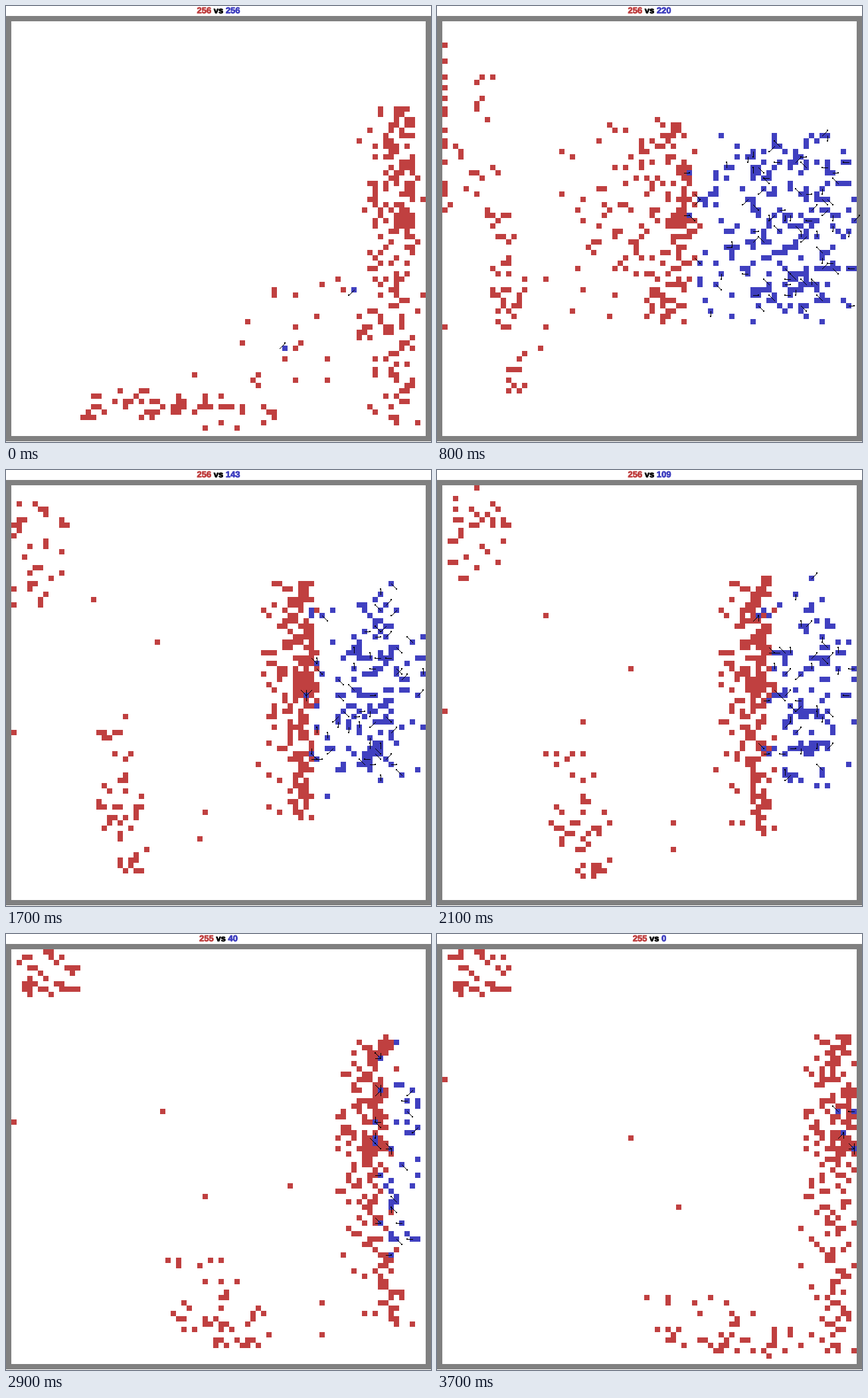
A matplotlib script for the animation above (3800 ms loop, 640 by 656 pixels).

```python
import numpy as np
import matplotlib.pyplot as plt
from matplotlib.animation import FuncAnimation
from matplotlib.patheffects import withStroke

W, H, DPI = 640, 656, 100
CELL, SIZE = 8, 78
FRAMES, LAST = 38, 36
CONTACT = 8                          # the charge ends, the battle line forms
ORIGIN = np.array([12, 27])          # centre of the top left cell
MIDDLE = 325                         # height where the line is densest
RIGHT = 628
WHITE, GRAY = (255, 255, 255), (128, 128, 128)
SIDES = {1: (192, 64, 64), 2: (64, 64, 192)}
RED, BLUE = "#c04040", "#4040c0"
BLUE_COUNT = ([1, 4, 8, 14, 17, 24, 29, 36], [256, 256, 220, 166, 143, 83, 40, 4])

# Lone reds walk straight from one point to another.
LONE_FROM = np.array([(12, 483), (164, 483), (156, 515), (76, 171), (60, 147), (92, 347), (332, 171)])
LONE_TO = np.array([(12, 219), (580, 579), (588, 627), (548, 443), (292, 307), (364, 411), (588, 179)])
LAST_BLUES = np.array([(604, 267), (628, 267), (612, 299), (628, 323)])
AFTERMATH_BLUES = np.array([(524, 427), (420, 515)])
UPPER, LOWER, LONE = 32, 44, len(LONE_FROM)
REAR = UPPER + LOWER + LONE
MAIN = 256 - REAR

rng = np.random.default_rng(21)


def formation(first_col):
    cols, rows = np.meshgrid(first_col + 2 * np.arange(16), 23 + 2 * np.arange(16))
    return np.stack([cols.ravel(), rows.ravel()], axis=1) * CELL + ORIGIN


def noisy_rank(values, noise):
    order = np.argsort(values + rng.normal(0, noise, len(values)))
    rank = np.empty(len(values))
    rank[order] = (np.arange(len(values)) + .5) / len(values)
    return rank


def muster_reds():
    """Order the red grid as lone walkers, upper group, lower group, main army."""
    start = formation(0)
    by_col = np.argsort(start[:, 0] + rng.normal(0, 40, 256))
    rear, main = by_col[:REAR], by_col[REAR:]
    rear = rear[np.argsort(start[rear, 1] + rng.normal(0, 30, REAR))]
    upper, lone, lower = np.split(rear, [UPPER, UPPER + LONE])
    return start[np.concatenate([lone, upper, lower, main])]


def phase(frame):
    return (frame - CONTACT) / (LAST - CONTACT)


def front(y, frame):
    """The battle line moves right at a steady pace and bends forward at its ends."""
    if frame < CONTACT:
        return 255 + (front(y, CONTACT) - 255) * (frame - 1) / (CONTACT - 1)
    bend = (60 * phase(frame) - 20) * ((y - MIDDLE) / 200) ** 2
    return np.minimum(385 + 8.8 * (frame - CONTACT) + bend, RIGHT)


RED_START = muster_reds()
SIDEWAYS = 2 * noisy_rank(RED_START[REAR:, 1], 12) - 1
BEHIND = 1 - np.sqrt(noisy_rank(-RED_START[REAR:, 0], 45))
BEHIND = BEHIND.max() - BEHIND
BEHIND = 1 - np.sqrt(1 - noisy_rank(BEHIND, .05))
RAGGED = rng.uniform(-14, 8, MAIN)
CLIMB_FROM = rng.uniform((-70, 50), (95, 315), (UPPER, 2))
CLIMB_TO = rng.uniform((22, 27), (110, 90), (UPPER, 2))
LOWER_X = rng.uniform(-1, 1, (LOWER, 2)).mean(axis=1) * 1.5
LOWER_Y = rng.random(LOWER)
LOWER_NOISE = rng.normal(0, 9, LOWER)


def main_army(frame):
    p = phase(frame)
    reach = np.where(SIDEWAYS < 0, 150 + 25 * p, 150 + 155 * p)
    y = MIDDLE + reach * SIDEWAYS * np.abs(SIDEWAYS) ** .2
    depth = 82 + 150 * np.exp(-(frame - CONTACT) / 3)
    x = front(y, frame) - depth * BEHIND ** (1 + .5 * (1 - p)) + RAGGED
    return np.stack([np.minimum(x, RIGHT), y], axis=1)


def upper_group(frame):
    """Climb along the left wall, then gather near the corner."""
    t = frame - CONTACT
    x = CLIMB_FROM[:, 0] + (CLIMB_TO - CLIMB_FROM)[:, 0] * min(1, t / 14)
    y = np.maximum(CLIMB_TO[:, 1], CLIMB_FROM[:, 1] - 1.4 * CELL * t)
    return np.stack([x, y], axis=1)


def lower_group(frame):
    """Sink to the bottom while speeding up to the right."""
    p, t = phase(frame), frame - CONTACT
    x = 104 + 5.5 * t + .21 * t * t + LOWER_X * (22 + 70 * p * p)
    low, high = 590 + 35 * p, 310 + 235 * p
    y = low - (low - high) * LOWER_Y ** (.8 + 1.2 * p) + LOWER_NOISE
    return np.stack([x, y], axis=1)


def red_points(frame):
    if frame < CONTACT:
        t = (frame - 1) / (CONTACT - 1)
        return RED_START * (1 - t) + red_points(CONTACT) * t
    lone = LONE_FROM + (LONE_TO - LONE_FROM) * phase(frame)
    return np.concatenate([lone, upper_group(frame), lower_group(frame), main_army(frame)])


def aftermath_points():
    """The end of an earlier battle: scattered stragglers and a crowd at the right."""
    dice = np.random.default_rng(4)
    stragglers = dice.uniform((316, 400), (560, 570), (LONE + UPPER - 12, 2))
    bottom = np.stack([dice.uniform(105, 415, LOWER + 12),
                       dice.normal(600, 16, LOWER + 12)], axis=1)
    return np.concatenate([stragglers, bottom, main_army(LAST) - (dice.uniform(0, 20, (MAIN, 1)) * (1, 0))])


def march_blues():
    """Random walks with a personal pace to the left."""
    start = formation(47)
    steps = rng.integers(-1, 2, (LAST, 256, 2)) * (rng.random((LAST, 256, 1)) < .7)
    walk = np.concatenate([np.zeros((1, 256, 2)), np.cumsum(steps, axis=0)])
    pace = rng.uniform(0, 5, 256)
    paths = start + CELL * walk
    paths[..., 0] -= pace * np.arange(LAST + 1)[:, None]
    paths[..., 0] = RIGHT - np.abs(RIGHT - paths[..., 0])
    # Those on the right live longest; the first four never fall.
    order = np.argsort(10 * pace - start[:, 0] + rng.normal(0, 50, 256))
    paths = paths[:, order]
    pull = np.linspace(0, 1, LAST + 1)[:, None, None]
    paths[:, :4] += (LAST_BLUES - paths[-1, :4]) * pull
    return paths


BLUE_PATHS = march_blues()
GAP = rng.random(256) ** 1.4


def blue_points(frame, count):
    points = BLUE_PATHS[frame, :count].copy()
    line = front(points[:, 1], frame)
    held = line - 14 + GAP[:count] * .75 * (RIGHT + 14 - line)
    points[4:, 0] = np.maximum(points[:, 0], held)[4:]
    return points


OFFSETS = sorted(((dc, dr) for dc in range(-6, 7) for dr in range(-6, 7)),
                 key=lambda o: (o[0] ** 2 + o[1] ** 2, o))
AROUND = OFFSETS[1:9]


def place(points, board, side):
    """Put every soldier on the free cell nearest to its point."""
    cells = []
    for c, r in np.clip(np.rint((points - ORIGIN) / CELL), 0, SIZE - 1).astype(int):
        for dc, dr in OFFSETS:
            x, y = c + dc, r + dr
            if 0 <= x < SIZE and 0 <= y < SIZE and not board[y, x]:
                board[y, x] = side
                cells.append((x, y))
                break
    return cells


def blues_alive(frame):
    return int(round(np.interp(frame, *BLUE_COUNT)))


def reds_alive(frame):
    return 256 if frame < 27 else 255


def battle(frame):
    """Return the board and the swords as (cell, direction)."""
    board = np.zeros((SIZE, SIZE), int)
    if frame == 0:
        blues = place(AFTERMATH_BLUES, board, 2)
        place(aftermath_points(), board, 1)
        return board, [(blues[0], (-1, 1)), ((50, 61), (1, -1))]
    dice = np.random.default_rng(100 + frame)
    blues = place(blue_points(frame, blues_alive(frame)), board, 2)
    reds = place(red_points(frame)[:reds_alive(frame)], board, 1)
    swords = [(cell, AROUND[dice.integers(8)]) for cell in blues
              if frame > 1 and dice.random() < .33]
    for x, y in reds:
        foes = [(dx, dy) for dx, dy in AROUND
                if 0 <= x + dx < SIZE and 0 <= y + dy < SIZE and board[y + dy, x + dx] == 2]
        if foes and dice.random() < .45:
            swords.append(((x, y), foes[-1]))
    return board, swords


def paint(board, swords):
    stage = np.full((H, W, 3), 255, np.uint8)
    stage[15:655] = GRAY
    stage[23:647, 8:632] = WHITE
    for y, x in np.argwhere(board):
        top, left = 23 + CELL * y, 8 + CELL * x
        stage[top:top + CELL, left:left + CELL] = SIDES[board[y, x]]
    for cell, (dx, dy) in swords:
        x, y = np.array(cell) * CELL + ORIGIN
        for i in range(CELL + 1):
            stage[y + i * dy, x + i * dx] = 0
        x, y = x + CELL * dx, y + CELL * dy
        stage[y - 1:y + 1, x - 1:x + 1] = 0
    return stage


fig = plt.figure(figsize=(W / DPI, H / DPI), dpi=DPI, facecolor="white")
ax = fig.add_axes([0, 0, 1, 1])
ax.axis("off")
picture = ax.imshow(np.full((H, W, 3), 255, np.uint8), extent=(0, W, H, 0),
                    interpolation="nearest", aspect="auto")


def label(color):
    return ax.text(0, 11, "", color=color, fontsize=13 * 72 / DPI, weight="bold",
                   family="Liberation Sans", va="baseline",
                   path_effects=[withStroke(linewidth=.5, foreground=color)])


labels = [label(c) for c in (RED, "black", BLUE)]


def write_score(red, blue):
    digit, space = 13 * .556, 13 * .278
    words = [str(red), "vs", str(blue)]
    x = W / 2 - (sum(map(len, words)) * digit + 2 * space) / 2
    for text, word in zip(labels, words):
        text.set_text(word)
        text.set_x(x)
        x += len(word) * digit + space


def update(frame):
    picture.set_data(paint(*battle(min(frame, LAST))))
    write_score(reds_alive(frame), blues_alive(frame) if frame <= LAST else 0)
    return [picture, *labels]


anim = FuncAnimation(fig, update, frames=FRAMES, interval=100, repeat=True, repeat_delay=0)
plt.show()
```
